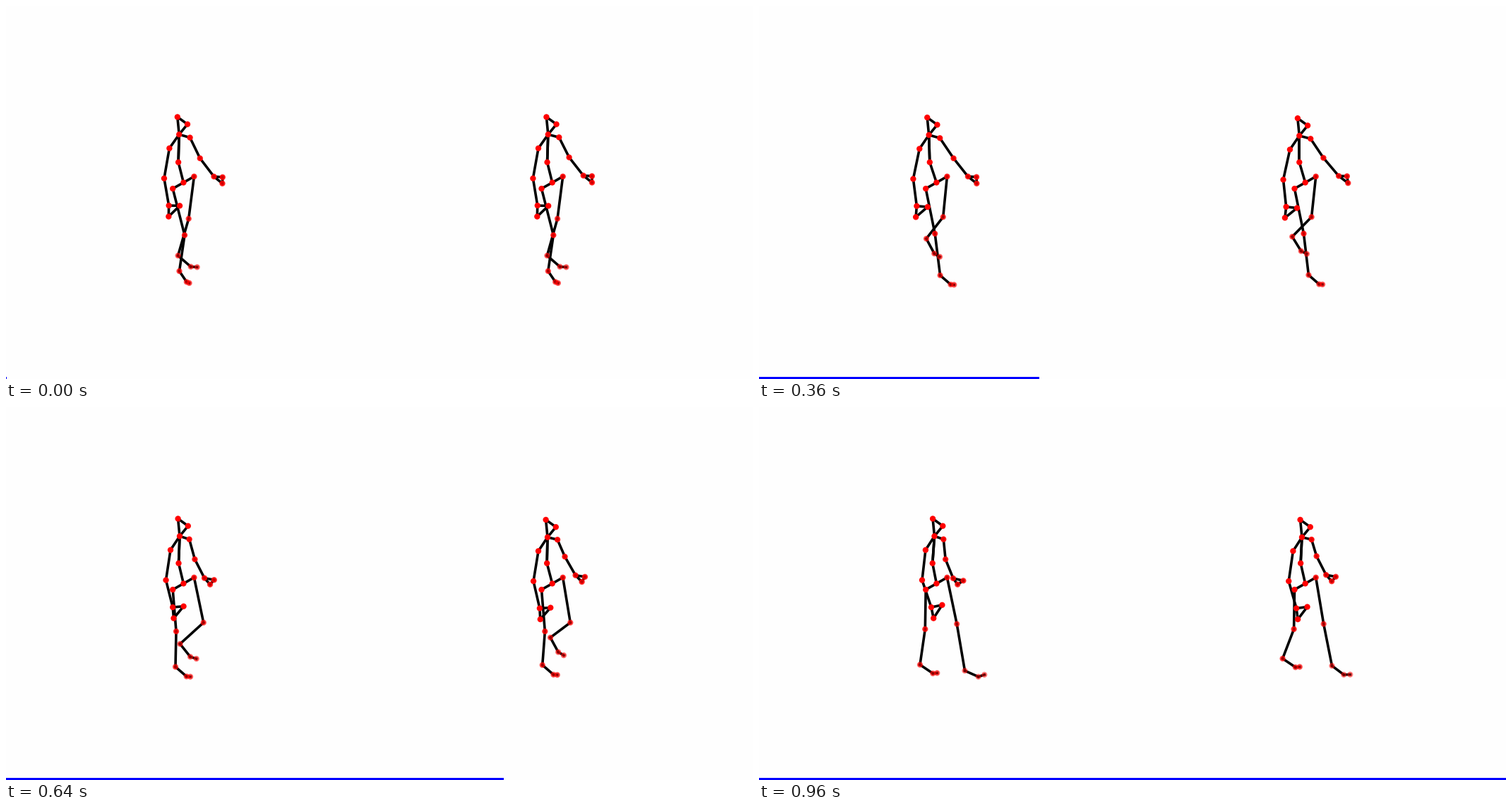
Write a matplotlib script that moves like this. It is 1058 by 529 pixels and loops after 1 s.

```python
import numpy as np
import matplotlib.pyplot as plt
from matplotlib.animation import FuncAnimation
from matplotlib.collections import LineCollection
from matplotlib.patches import Rectangle

W, H, DPI = 1058, 529, 100
N, STEP = 25, 40
F = np.arange(N)
U = F / (N - 1)
KEYS = np.array([0, 3, 7, 11, 16, 20, 24])


def signal(v, f=F):
    """Smooth cubic through values placed at the key times."""
    v = np.asarray(v, float)
    f = np.clip(f, 0, N - 1)
    m = np.gradient(v, KEYS)
    k = np.clip(np.searchsorted(KEYS, f, side="right") - 1, 0, len(KEYS) - 2)
    d = KEYS[k + 1] - KEYS[k]
    u = (f - KEYS[k]) / d
    return ((1 + 2 * u) * (1 - u) ** 2 * v[k] + u * (1 - u) ** 2 * d * m[k]
            + u * u * (3 - 2 * u) * v[k + 1] + u * u * (u - 1) * d * m[k + 1])


def smooth(u):
    return (1 - np.cos(np.pi * np.clip(u, 0, 1))) / 2


def vec(x, y):
    return np.column_stack([x + 0 * U, y + 0 * U])


def polar(length, deg):
    a = np.radians(deg)
    return vec(length * np.cos(a), length * np.sin(a))


def torso(p, neck_x, sink):
    p["hip"] = vec(251.4, 250.4)
    p["near_hip"] = vec(236.2, 259)
    p["far_hip"] = vec(266.4, 241.8)
    x = signal(neck_x)
    p["neck"] = vec(x, 182.2 + sink * smooth(F / 14))
    p["spine"] = vec(244 + (x - 245) / 2, 221.6)
    p["head"] = p["neck"] + vec(-2.4, -24.8)
    p["nose"] = p["neck"] + vec(11.8, -14.5)


def near_arm(p, s):
    p["near_sho"] = p["neck"] + vec(-13.8 + 1.2 * U, 19.6)
    p["near_elbow"] = p["neck"] + vec(-17.5 - 5 * s, 62.3)
    p["near_wrist"] = p["near_elbow"] + vec(13 - 8.5 * s, 38.5)
    turn = 3.2 - 4.7 * s
    p["near_thumb"] = p["near_wrist"] + vec(15.4, -turn)
    p["near_tip"] = p["near_wrist"] + vec(turn, 15.6)


def far_arm(p, s, lift):
    up = lift * (1 - s)
    p["far_sho"] = p["neck"] + vec(12.7 + 3.6 * s, 4.4 - up / 4)
    p["far_elbow"] = vec(263.6 + 15 * s, 216 - up)
    p["far_wrist"] = vec(274 + 27.5 * s, 243 - 1.5 * s - up)
    p["far_thumb"] = vec(288.5 + 24.5 * s, 246.5 - 5 * s - up)
    p["far_tip"] = vec(280 + 35.5 * s, 251.7 - up)


def foot(p, side, length, toe, pitch):
    """The toes bend a little more than the foot tips."""
    p[side + "_foot"] = p[side + "_ankle"] + polar(length, pitch)
    p[side + "_toe"] = p[side + "_foot"] + polar(toe, 5 + 1.3 * (pitch - 42))


def near_leg(p, drift):
    e = smooth(U ** 1.2)
    p["near_knee"] = vec(253 - 17.7 * e, 325 - 10 * e)
    back = drift * U ** 3
    p["near_ankle"] = vec(signal([245.5, 265, 261, 251.5, 240, 233.6, 228]) - back,
                          signal([376, 390, 386.5, 377, 368.5, 368, 365.5]) - back)
    foot(p, "near", 18.5 + 3.5 * U, 4 + 2 * U, signal([56, 37, 39, 43, 41, 37, 34]))


def far_leg(p, ankle_x, ankle_y, reach, lag):
    settle = 1 - smooth(F / 7)
    p["far_knee"] = vec(256.7 + 2 * settle + reach * smooth((F - 6) / 11),
                        298.7 + 3 * settle + 9 * smooth((F - 7) / 13))
    p["far_ankle"] = vec(signal(ankle_x), signal(ankle_y))
    foot(p, "far", 24 - 3 * U ** 4, 9,
         signal([41, 42, 53, 68, 51.5, 33, 24], F - lag * U ** 2))


def walker(dx, neck_x, sink, swing, lift, drift, ankle_x, ankle_y, reach, lag):
    p = {}
    torso(p, neck_x, sink)
    near_arm(p, signal(swing, F - 2))
    far_arm(p, signal(swing), lift)
    near_leg(p, drift)
    far_leg(p, ankle_x, ankle_y, reach, lag)
    return {n: xy + [dx, 0] for n, xy in p.items()}


left = walker(
    dx=0, sink=1, lift=0, drift=0, reach=23.5, lag=0,
    neck_x=[245.2, 245, 241.2, 241, 246, 247.6, 248.5],
    swing=[.745, 1, .945, .62, .255, 0, .036],
    ankle_x=[243.6, 241, 238.5, 236.6, 246.5, 273, 291.5],
    ankle_y=[354, 350, 337, 325.4, 336, 367, 374])
right = walker(
    dx=522.3, sink=2.5, lift=6, drift=8.7, reach=20.7, lag=5,
    neck_x=[245.5, 246.1, 244.7, 241.7, 244.7, 246.5, 246.7],
    swing=[.78, 1.05, 1.05, .716, .375, .262, .25],
    ankle_x=[244.1, 239.7, 233.3, 234.7, 248.7, 272.3, 289.2],
    ankle_y=[354, 349.5, 337.5, 318.8, 327, 353, 367])
poses = [left, right]
names = list(left)

LEG = "hip {0}_hip {0}_knee {0}_ankle {0}_foot {0}_toe"
ARM = "neck {0}_sho {0}_elbow {0}_wrist {0}_thumb {0}_tip {0}_wrist"
CHAINS = [c.split() for c in (
    LEG.format("near"), LEG.format("far"), "hip spine neck nose head neck", "spine neck",
    ARM.format("near"), ARM.format("far"))]
BONES = [b for c in CHAINS for b in zip(c, c[1:])]


def opacity(name, y, u):
    """Markers pale with depth: the far side, and the legs downwards."""
    if name.startswith("far"):
        return .97 - .0025 * (y - 187) - .06 * u
    if name.endswith(("knee", "ankle", "foot", "toe")):
        return 1.02 - .0031 * (y - 259) - .1 * u
    return 1


fig = plt.figure(figsize=(W / DPI, H / DPI), dpi=DPI, facecolor="#fefefe")
ax = fig.add_axes([0, 0, 1, 1])
ax.set_xlim(0, W)
ax.set_ylim(H, 0)
ax.axis("off")

count = len(poses) * len(names)
bones = LineCollection([], colors="black", linewidths=2.6, capstyle="projecting", zorder=1)
ax.add_collection(bones)
dots = ax.scatter(np.zeros(count), np.zeros(count), s=20, linewidths=1.5, zorder=2)
bar = ax.add_patch(Rectangle((0, H - 2.8), 1, 2.8, color="blue", lw=0, zorder=3))


def draw(i):
    u = U[i]
    bones.set_segments([[p[a][i], p[b][i]] for p in poses for a, b in BONES])
    dots.set_offsets([p[n][i] for p in poses for n in names])
    rgba = [(1, 0, 0, opacity(n, p[n][i][1], u)) for p in poses for n in names]
    dots.set_facecolors(rgba)
    dots.set_edgecolors(rgba)
    bar.set_width(max(W * u, 1.2))
    return bones, dots, bar


anim = FuncAnimation(fig, draw, frames=N, interval=STEP, repeat=True, repeat_delay=0)
plt.show()
```
